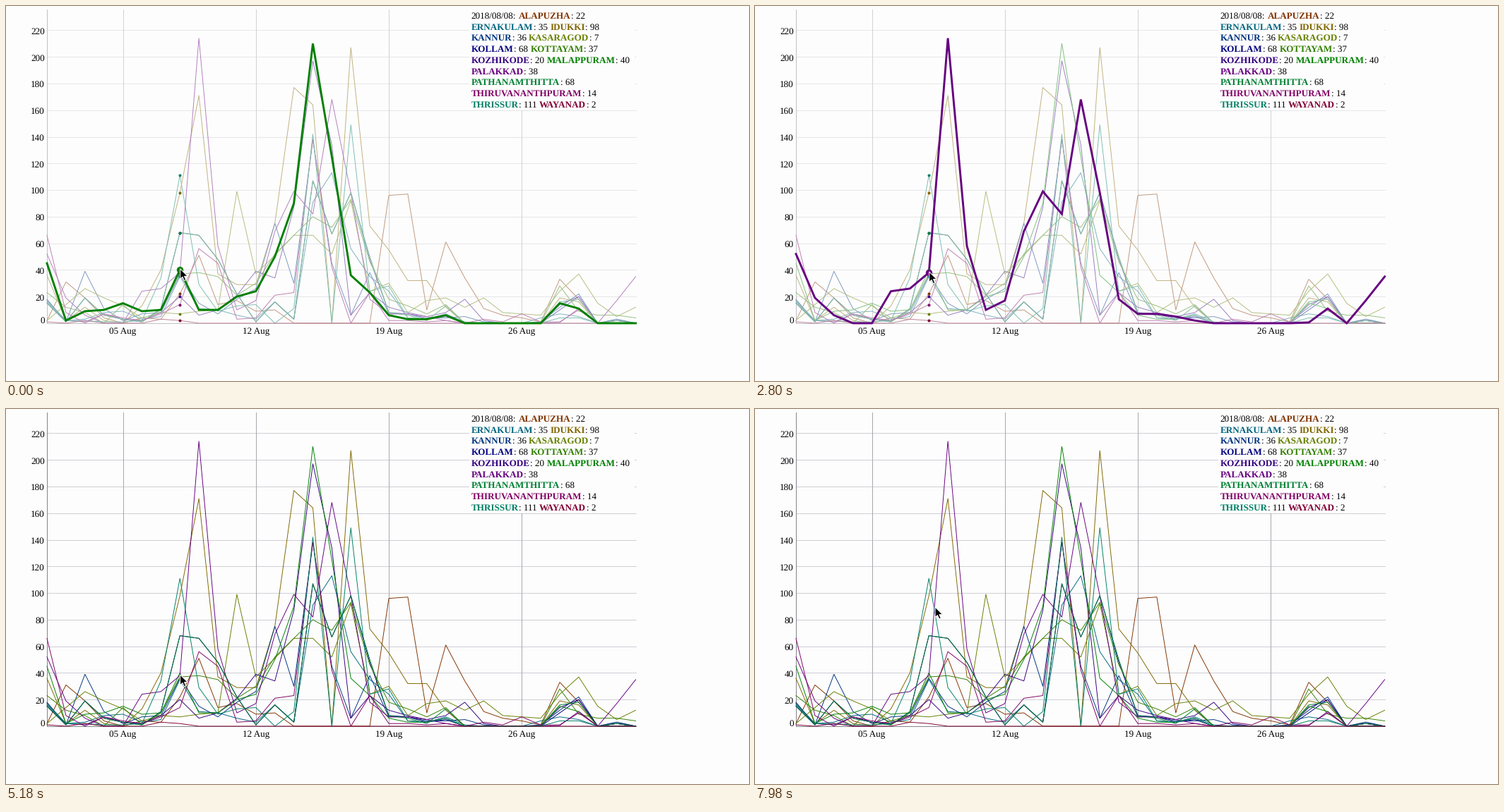
Animation of 1052x532 px, one loop 8000 ms. Source, as a matplotlib script:

```python
import colorsys
import math

import matplotlib
import matplotlib.pyplot as plt
from matplotlib.animation import FuncAnimation
from matplotlib.patches import Polygon, Rectangle

matplotlib.rcParams["text.hinting"] = "none"
matplotlib.rcParams["font.family"] = "Liberation Serif"

W, H, DPI = 1052, 532, 100
LOOP, STEP = 8000, 40
LEFT, TOP, RIGHT, BASE = 58, 5, 891.5, 450
DAY, UNIT = 26.89, 1.889
PAPER = "#fdfdfd"
SIZE = 13.15
PICKED_DAY = 7

# Times in ms
SWITCH, FADE_START, FADE_TIME = 280, 2880, 300


def px(n):
    return n * 72 / DPI


def day_x(i):
    return LEFT + DAY * i


def value_y(v):
    return BASE - UNIT * v


fig = plt.figure(figsize=(W / DPI, H / DPI), dpi=DPI, facecolor=PAPER)
ax = fig.add_axes([0, 0, 1, 1])
ax.set_xlim(0, W)
ax.set_ylim(H, 0)
ax.axis("off")


def line(xs, ys, color, width=1.0, z=1, **kw):
    return ax.plot(xs, ys, color=color, lw=px(width), zorder=z, **kw)[0]


def label(x, y, text, color="black", weight="normal", ha="left"):
    return ax.text(x, y, text, color=color, weight=weight, ha=ha,
                   va="baseline", fontsize=px(SIZE), zorder=8)


# Grid, axes and their labels
for v in range(0, 240, 20):
    y = value_y(v)
    if v:
        line([LEFT, RIGHT], [y, y], "#cfcfd6")
    label(54.7, y + 5.2 if v else 449.6, str(v), ha="right")
for i in range(4, 31, 7):
    x = day_x(i)
    line([x, x], [TOP, BASE], "#a9a9ae")
    label(x, 465.6, f"{i + 1:02d} Aug", ha="center")
line([LEFT, LEFT], [TOP, BASE], "#85858c")
line([LEFT, RIGHT], [BASE, BASE], "#85858c")

COUNT, DAYS = 14, 32
series = []


def add(name, *values):
    """Plot one district; hues alternate between two halves of the wheel."""
    i = len(series)
    slot = COUNT // 2 + (i + 1) // 2 if i % 2 else math.ceil((i + 1) / 2)
    color = colorsys.hsv_to_rgb(slot / (COUNT + 1), 1, 0.5)
    values = list(values) + [0] * (DAYS - len(values))
    xs = [day_x(d) for d in range(DAYS)]
    ys = [value_y(v) for v in values]
    line(xs, ys, color, 0.95, z=2)
    series.append((name, values, color, xs, ys))


add("ALAPUZHA", 2, 31, 19, 4, 0, 4, 3, 22, 51, 14, 17, 9, 10, 0, 0, 0, 0, 0,
    96, 97, 10, 61, 34, 11, 6, 4, 1, 33, 18)
add("ERNAKULAM", 16, 2, 3, 8, 9, 3, 5, 35, 11, 10, 6, 3, 16, 3, 91, 113, 56,
    35, 24, 4, 3, 7, 1, 0, 0, 0, 4, 7, 5, 0, 3)
add("IDUKKI", 36, 2, 12, 2, 0, 13, 40, 98, 171, 37, 29, 29, 75, 177, 164, 0,
    207, 73, 55, 32, 32, 12, 0, 0, 0, 0, 0, 19, 16)
add("KANNUR", 18, 1, 39, 11, 2, 7, 8, 36, 15, 7, 18, 26, 75, 30, 138, 45, 6,
    38, 7, 7, 4, 4, 5, 1, 0, 0, 1, 12, 22, 0, 3)
add("KASARAGOD", 2, 14, 26, 19, 13, 4, 8, 7, 9, 10, 99, 37, 51, 66, 66, 52,
    92, 24, 30, 8, 17, 19, 12, 19, 8, 7, 6, 24, 37, 15, 5, 12)
add("KOLLAM", 15, 1, 19, 6, 3, 1, 11, 68, 66, 48, 22, 1, 16, 3, 107, 67, 98,
    48, 8, 7, 3, 5, 0, 0, 0, 0, 0, 10, 20, 0, 2)
add("KOTTAYAM", 23, 12, 8, 0, 14, 1, 10, 37, 38, 35, 21, 30, 52, 66, 80, 72,
    93, 46, 18, 13, 7, 14, 0, 0, 0, 0, 0, 28, 9, 6, 6, 4)
add("KOZHIKODE", 17, 2, 1, 7, 3, 2, 8, 20, 6, 10, 21, 39, 34, 87, 197, 134, 6,
    23, 12, 8, 5, 8, 18, 2, 0, 0, 0, 14, 20, 0, 2)
add("MALAPPURAM", 45, 2, 9, 10, 15, 9, 10, 40, 10, 10, 20, 24, 50, 90, 210,
    125, 36, 23, 6, 3, 3, 6, 0, 0, 0, 0, 0, 15, 11)
add("PALAKKAD", 52, 19, 6, 0, 0, 24, 26, 38, 214, 58, 10, 17, 69, 99, 82, 168,
    98, 18, 7, 7, 5, 2, 0, 0, 0, 0, 0, 0.5, 11, 0, 17, 35)
add("PATHANAMTHITTA", 15, 1, 19, 6, 3, 1, 11, 68, 66, 48, 22, 1, 16, 3, 107,
    67, 98, 50, 8, 6, 2, 13, 0, 0, 0, 0, 0, 16, 18, 0, 2)
add("THIRUVANANTHPURAM", 66, 8, 0, 7, 4, 2, 7, 14, 56, 45, 3, 4, 21, 23, 138,
    42, 0, 23, 2, 2, 1, 2, 0, 3, 1, 7, 1, 1, 10)
add("THRISSUR", 17, 2, 2, 1, 1, 2, 34, 111, 29, 9, 13, 14, 0, 11, 142, 0, 149,
    24, 28, 4, 3, 6, 0, 0, 0, 0, 0, 4, 4)
add("WAYANAD", 1, 0, 2, 0, 0, 0, 3, 2)

# Veil that pales the chart while one series is picked out
veil = ax.add_patch(Rectangle((LEFT - 2, TOP - 1), RIGHT - LEFT + 5,
                              BASE - TOP + 3, fc=PAPER, lw=0, zorder=3))


def dot(x, y, color, radius, z):
    return line([x], [y], color, z=z, marker="o", ms=px(2 * radius), mew=0)


dots = [dot(xs[PICKED_DAY], ys[PICKED_DAY], color, 2, 6)
        for _, _, color, xs, ys in series]


def highlight(name):
    _, _, color, xs, ys = next(s for s in series if s[0] == name)
    return [line(xs, ys, color, 2.9, z=5, solid_joinstyle="miter"),
            dot(xs[PICKED_DAY], ys[PICKED_DAY], color, 4.7, 7)]


first, second = highlight("MALAPPURAM"), highlight("PALAKKAD")

# Legend
ax.add_patch(Rectangle((656, 4), 234, 143.5, fc=PAPER, lw=0, zorder=4))
renderer = fig.canvas.get_renderer()
LEGEND_X, ROW = 658.7, 15.75
GAP = SIZE / 4
pen = {"x": LEGEND_X, "y": 17.8}


def write(text, color="black", weight="normal"):
    t = label(pen["x"], pen["y"], text, color, weight)
    pen["x"] += t.get_window_extent(renderer).width


write("2018/08/08:")
pen["x"] += GAP
ROW_ENDS = {"ALAPUZHA", "IDUKKI", "KASARAGOD", "KOTTAYAM", "MALAPPURAM",
            "PALAKKAD", "PATHANAMTHITTA", "THIRUVANANTHPURAM"}
for name, values, color, _, _ in series:
    write(name, color, "bold")
    pen["x"] += 0.6
    write(f": {values[PICKED_DAY]}")
    pen["x"] += GAP
    if name in ROW_ENDS:
        pen.update(x=LEGEND_X, y=pen["y"] + ROW)

# Mouse pointer
ARROW = [(0, 0), (0, 14.6), (3.4, 11.5), (5.8, 16.8), (8.2, 15.8),
         (5.9, 10.6), (10.5, 10.4)]
pointer = ax.add_patch(Polygon(ARROW, closed=True, fc="black", ec="white",
                               lw=px(1), zorder=10))

# Pointer stops: time, x, y
PATH = [(0, 246.6, 372.8), (SWITCH - 120, 246.6, 372.8),
        (SWITCH + 40, 246.6, 377), (5440, 246.6, 377), (6240, 254, 288.8),
        (6600, 254, 288.8), (7320, 255, 281), (LOOP, 255, 281)]


def pointer_at(t):
    for (t0, x0, y0), (t1, x1, y1) in zip(PATH, PATH[1:]):
        if t <= t1:
            k = (t - t0) / (t1 - t0)
            k = k * k * (3 - 2 * k)
            return x0 + (x1 - x0) * k, y0 + (y1 - y0) * k
    return PATH[-1][1:]


def show(artists, on):
    for a in artists:
        a.set_visible(on)


def update(frame):
    t = frame * STEP
    level = min(1, max(0, 1 - (t - FADE_START) / FADE_TIME))
    veil.set_alpha(0.5 * level)
    show(dots, level > 0)
    show(first, t < SWITCH)
    show(second, t >= SWITCH and level > 0)
    x, y = pointer_at(t)
    pointer.set_xy([(x + dx, y + dy) for dx, dy in ARROW])
    return []


anim = FuncAnimation(fig, update, frames=LOOP // STEP, interval=STEP,
                     init_func=lambda: update(0), repeat=True,
                     repeat_delay=0, blit=False)
plt.show()
```
